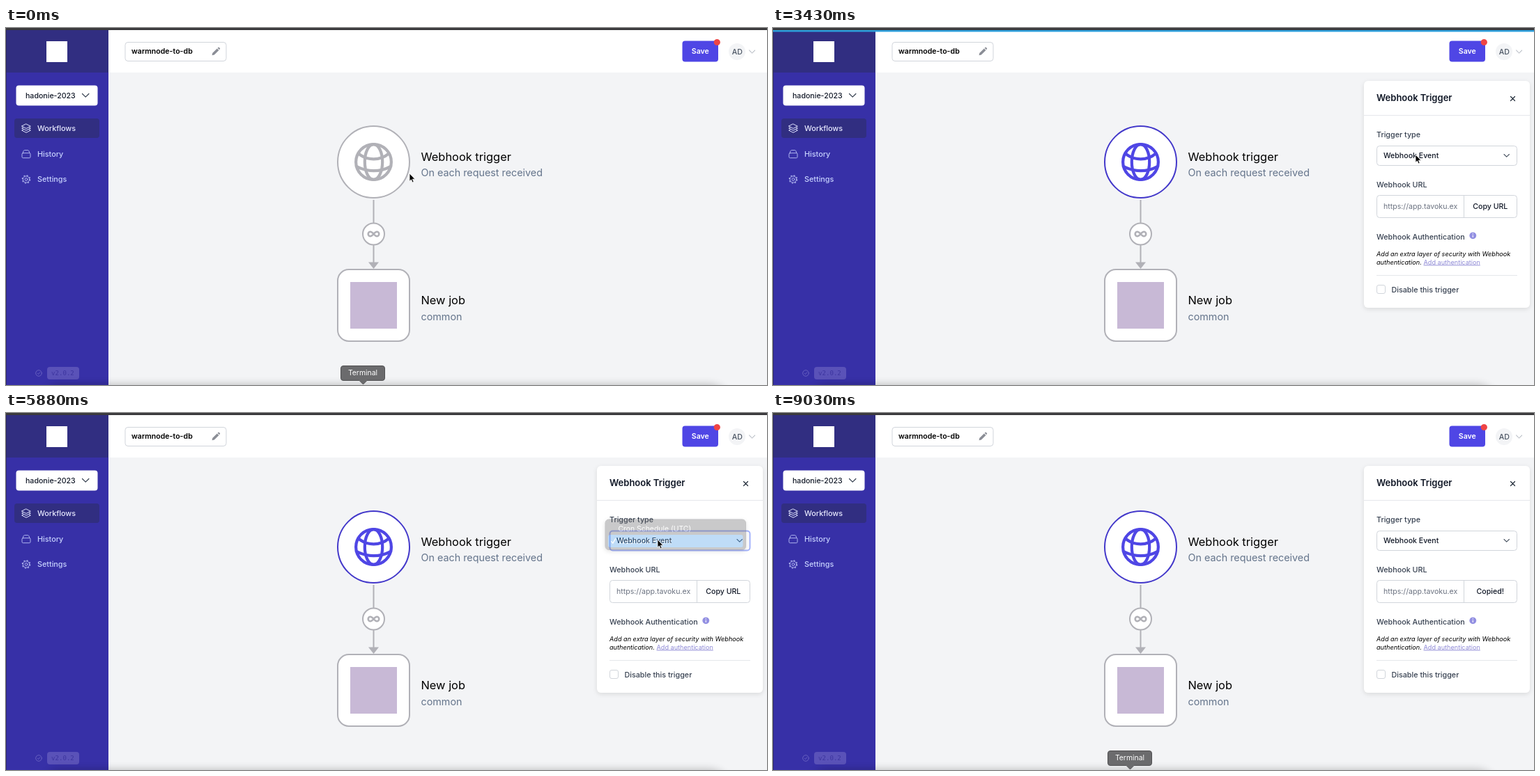
These frames come from a looping animation (1092 by 513 pixels, 9.1 s). An HTML page:

```html
<!DOCTYPE html>
<html lang="en">
<head>
<meta charset="utf-8">
<title>Workflow editor</title>
<style>
  html, body { margin: 0; width: 100%; height: 100%; overflow: hidden; background: #f3f4f6; }
  svg { display: block; }
  text { font-family: Inter, "Noto Sans", sans-serif; font-size: 10.6px; fill: #111827; }
  .medium { font-weight: 500; }
  .bold { font-weight: 600; }
  .title { font-size: 16.4px; fill: #000; }
  .subtitle { font-size: 14.33px; fill: #64748b; }
  .heading { font-size: 13px; font-weight: 600; }
  .note { font-size: 9.15px; font-style: italic; fill: #000; }
  .label { font-size: 10.75px; font-weight: 500; fill: #374151; }
  .nav { font-size: 10.8px; font-weight: 500; fill: #c7d2fe; }
  .option { font-size: 10.4px; fill: #fff; }
  .mono { font-family: "DejaVu Sans Mono", monospace; font-size: 9.1px; }
  .line { fill: none; stroke-linecap: round; stroke-linejoin: round; }
  .field { fill: #fff; stroke: #d1d5db; }
  .node { fill: #fff; stroke: #b1b1b7; stroke-width: 2; }
  #trigger { --ring: #b1b1b7; --globe: #b1b1b7; }
  #trigger.selected { --ring: #4338ca; --globe: #4f46e5; }
  #trigger .node { stroke: var(--ring); }
  #globe { stroke: var(--globe); }
  #select.focused { stroke: #a5b4fc; stroke-width: 2; }
</style>
</head>
<body>
<svg width="1092" height="513" viewBox="0 0 1092 513">
  <defs>
    <filter id="soft" x="-10%" y="-10%" width="120%" height="125%">
      <feDropShadow dx="0" dy="2" stdDeviation="3" flood-opacity=".11"/>
    </filter>
    <filter id="menuShadow" x="-10%" y="-30%" width="120%" height="170%">
      <feDropShadow dx="0" dy="2" stdDeviation="3" flood-opacity=".35"/>
    </filter>
    <filter id="blur" x="-10%" y="-100%" width="120%" height="300%">
      <feGaussianBlur stdDeviation="7"/>
    </filter>
    <clipPath id="urlClip"><rect x="867" y="241" width="115" height="31"/></clipPath>
  </defs>

  <rect width="1092" height="513" fill="#f3f4f6"/>
  <rect x="147" width="945" height="64" fill="#fff"/>

  <!-- Sidebar -->
  <rect width="147" height="513" fill="#3730a7"/>
  <rect width="147" height="64" fill="#312e81"/>
  <rect x="58" y="19" width="30" height="30" fill="#fff"/>
  <rect x="14.500" y="82.500" width="117" height="29" rx="4" fill="#fff"/>
  <text class="medium" x="28" y="101">hadonie-2023</text>
  <path class="line" d="M109.500 94.500l4.700 4.700 4.700-4.700" stroke="#374151" stroke-width="1.200"/>
  <rect x="12" y="130" width="122" height="28" rx="4" fill="#312e81"/>
  <path class="line" d="M29 138l6.300 3.200-6.300 3.200-6.300-3.200zM25 142.600l-2.300 1.400 6.300 3.200 6.300-3.200-2.300-1.400M25 145.700l-2.300 1.400 6.300 3.200 6.300-3.200-2.300-1.400" stroke="#dfe3ff"/>
  <text class="nav" x="45" y="148" style="fill:#e8eaff">Workflows</text>
  <g class="line" stroke="#aeb3ee">
    <path d="M24 179.700l1.300-3.200q.3-.8 1.200-.8h5q.9 0 1.200.8l1.300 3.200"/>
    <rect x="23" y="179.700" width="12" height="7" rx="1.500"/>
    <circle cx="29" cy="217.500" r="4.600"/>
    <circle cx="29" cy="217.500" r="5.600" stroke-dasharray="2 2.400" stroke-linecap="butt" stroke-width="1.400"/>
    <circle cx="29" cy="217.500" r="1.900"/>
  </g>
  <text class="nav" x="45" y="185">History</text>
  <text class="nav" x="45" y="221.300">Settings</text>
  <g class="line" stroke="#665fc0"><circle cx="47" cy="496" r="4.300"/><path d="M45.300 496.200l1.200 1.300 2.200-2.700"/></g>
  <rect x="59" y="487" width="46" height="18" rx="4" fill="#5a52b8"/>
  <text class="mono" x="65" y="499.300" style="fill:#3d359f">v2.0.2</text>

  <!-- Top bar -->
  <rect x="171" y="20.500" width="145" height="27" rx="4" class="field"/>
  <text class="bold" x="180" y="37.400" style="fill:#000">warmnode-to-db</text>
  <path d="M295.600 39.300l.7-3.300 6.600-6.600 2.600 2.600-6.600 6.600zM303.600 28.700l.9-.8q.7-.6 1.400 0l1 1q.7.7 0 1.400l-.8.9z" fill="#8b8e96"/>
  <rect x="970.500" y="18.500" width="51.500" height="30" rx="4" fill="#4f46e5"/>
  <text class="bold" x="996.300" y="37.400" text-anchor="middle" style="fill:#fff">Save</text>
  <circle cx="1020.300" cy="20.500" r="4.600" fill="#ef4444"/>
  <circle cx="1049" cy="34" r="12" fill="#f3f4f6"/>
  <text class="medium" x="1049.300" y="37.500" text-anchor="middle" style="fill:#4b5563">AD</text>
  <path class="line" d="M1066.500 32l4.100 4 4.100-4" stroke="#9ca3af"/>

  <!-- Workflow diagram -->
  <path d="M527.500 247V340" stroke="#b1b1b7" stroke-width="2"/>
  <path d="M520 336.500h15l-7.500 9.500z" fill="#b1b1b7"/>
  <circle class="node" cx="527.500" cy="296" r="15.500"/>
  <path class="line" d="M527.500 296c-2-2.400-3.100-3.200-4.600-3.200a3.200 3.200 0 000 6.400c1.500 0 2.600-.8 4.600-3.200s3.100-3.200 4.600-3.200a3.200 3.200 0 010 6.400c-1.500 0-2.600-.8-4.600-3.200z" stroke="#b1b1b7" stroke-width="2.600"/>
  <g id="trigger">
    <circle class="node" cx="527.500" cy="192.500" r="51.500"/>
    <g id="globe" class="line" transform="translate(527.500 192.500) scale(2.820)" stroke-width="1.500">
      <circle r="9"/>
      <ellipse rx="4.500" ry="9"/>
      <path d="M-7.840-4.420A11.950 11.950 0 000-1.500 11.950 11.950 0 007.840-4.420M-8.720 2.250A17.920 17.920 0 000 4.500 17.920 17.920 0 008.720 2.250"/>
    </g>
  </g>
  <text class="title" x="595.500" y="191">Webhook trigger</text>
  <text class="subtitle" x="595.500" y="213">On each request received</text>
  <rect class="node" x="476" y="347" width="103" height="103" rx="16"/>
  <rect x="494" y="365" width="67" height="67" fill="#c8b9d6"/>
  <text class="title" x="595.500" y="397">New job</text>
  <text class="subtitle" x="595.500" y="419.500">common</text>

  <!-- Trigger panel -->
  <g id="panel">
    <rect x="848" y="76" width="238" height="326" rx="6" fill="#fff" filter="url(#soft)"/>
    <text class="heading" x="866" y="105">Webhook Trigger</text>
    <path class="line" d="M1058.500 98.500l6 6m0-6l-6 6" stroke="#1f2937" stroke-width="1.200"/>
    <path d="M848 125.500h238M866 355.500h202" stroke="#e5e7eb"/>
    <text class="label" x="866" y="157">Trigger type</text>
    <rect id="select" class="field" x="866.500" y="169.500" width="201" height="28" rx="4"/>
    <text class="medium" x="876" y="187">Webhook Event</text>
    <path class="line" d="M1049 181.500l3.700 3.700 3.700-3.700" stroke="#4b5563" stroke-width="1.100"/>
    <text class="label" x="866" y="229">Webhook URL</text>
    <rect class="field" x="866.500" y="240.500" width="201" height="32" rx="4"/>
    <path d="M991.500 240.500v32" stroke="#d1d5db"/>
    <text x="876" y="260.300" clip-path="url(#urlClip)" style="fill:#6b7280">https://app.tavoku.example</text>
    <text id="copy" class="medium" x="1029.300" y="260.300" text-anchor="middle"></text>
    <text class="label" x="866" y="304">Webhook Authentication</text>
    <circle cx="1004.300" cy="298.300" r="4.900" fill="#9390e2"/>
    <path d="M1004.300 297.800v3M1004.300 295.300v1.200" stroke="#fff" stroke-width="1.200"/>
    <text class="note" x="866" y="327.500">Add an extra layer of security with Webhook</text>
    <text class="note" x="866" y="339.500">authentication.</text>
    <text class="note" x="933.500" y="339.500" text-decoration="underline" style="font-style:normal;fill:#8f8ad6">Add authentication</text>
    <rect class="field" x="866.500" y="369.500" width="12" height="12" rx="2.500"/>
    <text class="label" x="887.500" y="379.500">Disable this trigger</text>
  </g>

  <!-- Native select menu -->
  <g id="menu">
    <rect x="860" y="153" width="201.500" height="43.500" rx="5" fill="#606062" stroke="#505052" filter="url(#menuShadow)"/>
    <rect id="highlight" x="864" width="193.500" height="18" rx="3" fill="#4198e8"/>
    <path class="line" d="M868.800 184.600l2 2.600 3.700-6.400" stroke="#fff" stroke-width="1.300"/>
    <text class="option" x="878.500" y="170.300">Cron Schedule (UTC)</text>
    <text class="option" x="878.500" y="188">Webhook Event</text>
  </g>

  <!-- Screen edges -->
  <rect x="50" y="514.500" width="988" height="60" rx="28" opacity=".32" filter="url(#blur)"/>
  <rect width="1" height="513" fill="#1e1b4b" opacity=".6"/>
  <rect width="1092" height="3" fill="#3b3a3d"/>
  <rect id="progress" y="3" height="2.500" fill="#2d9fdc"/>

  <g id="tooltip">
    <path d="M484 485.500h56q3.500 0 3.500 3.500v14q0 3.500-3.500 3.500h-22l-5.500 5.500-5.500-5.500h-23q-3.500 0-3.500-3.500v-14q0-3.500 3.500-3.500z" fill="#6b6b6d" stroke="#505052"/>
    <text class="option" x="512" y="499.300" text-anchor="middle">Terminal</text>
  </g>

  <g id="cursor">
    <path id="arrow" d="M0 0v11.200l2.500-2.300 1.700 4 1.900-.8-1.700-3.900h3.500z" fill="#000" stroke="#fff" stroke-width=".8"/>
    <path id="hand" d="M-1.300 1.200q0-1.200 1.200-1.200t1.300 1.200l.4 3.600q1.200-.6 1.900.5 1.300-.5 1.900.6 1.700-.4 2 1.200v2.300q-.2 2-1.300 3.100v1.500h-5.500q-.8-2-2.500-3.700-1.600-1.700-2-2.600-.3-1.200.8-1.300 1.100 0 2.200 1.400zM1.800 9v2.600M3.600 9v2.600M5.300 9v2.600" fill="#fff" stroke="#111" stroke-width=".9" stroke-linejoin="round"/>
  </g>
</svg>

<script>
  const LOOP = 9100, STEP = 70;
  const el = id => document.getElementById(id);
  const within = (t, from, to) => t >= from && t < to;
  const show = (id, opacity) => el(id).setAttribute('opacity', +opacity);

  // Linear interpolation over [time, value, ...] keys, held at both ends.
  function track(keys, t) {
    const next = keys.findIndex(key => key[0] > t);
    if (next < 0) return keys[keys.length - 1].slice(1);
    if (next === 0) return keys[0].slice(1);
    const a = keys[next - 1], b = keys[next];
    const k = (t - a[0]) / (b[0] - a[0]);
    return a.slice(1).map((v, i) => v + (b[i + 1] - v) * k);
  }

  const pointer = [
    [0, 579, 209], [140, 561, 193], [560, 561, 193], [630, 549.5, 186.5],
    [2450, 549.5, 186.5], [2660, 565.5, 183], [2800, 620, 190], [2940, 705, 199],
    [3150, 830, 204], [3430, 922, 182], [3570, 929, 178], [3710, 929, 178],
    [3990, 935.5, 180], [4550, 935.5, 181], [4690, 934, 167], [5000, 934, 165],
    [5180, 935, 182], [6020, 935, 182], [6160, 962, 208], [6300, 1012, 252],
    [6580, 1012, 252], [6720, 1017.5, 257], [7840, 1017.5, 257], [8050, 985, 300],
    [8400, 720, 440], [8680, 512, 516]
  ];
  const progressWidth = [[1750, 0], [1890, 61], [2030, 61], [2240, 250], [2450, 250], [2520, 1092]];
  const progressFade = [[3430, 1], [3990, 0]];
  const panelFade = [[2030, 0], [2240, 1]];
  const menuFade = [[5740, 1], [5950, 0]];

  function render(t) {
    const [x, y] = track(pointer, t);
    const overButton = within(t, 70, 2730) || within(t, 6230, 7980);
    el('cursor').setAttribute('transform', `translate(${x} ${y})`);
    show('hand', overButton);
    show('arrow', !overButton);

    el('trigger').classList.toggle('selected', t >= 1750);
    el('progress').setAttribute('width', track(progressWidth, t)[0]);
    show('progress', track(progressFade, t)[0]);
    show('panel', track(panelFade, t)[0]);

    el('select').classList.toggle('focused', within(t, 4130, 6580));
    show('menu', t >= 4270 ? track(menuFade, t)[0] : 0);
    el('highlight').setAttribute('y', within(t, 4690, 5110) ? 157 : 175);
    el('copy').textContent = t < 6860 ? 'Copy URL' : 'Copied!';
    show('tooltip', t < 70 || t >= 8890);
  }

  const start = performance.now();
  function frame() {
    const t = (performance.now() - start) % LOOP;
    render(Math.floor(t / STEP) * STEP);
    requestAnimationFrame(frame);
  }
  frame();
</script>
</body>
</html>
```
